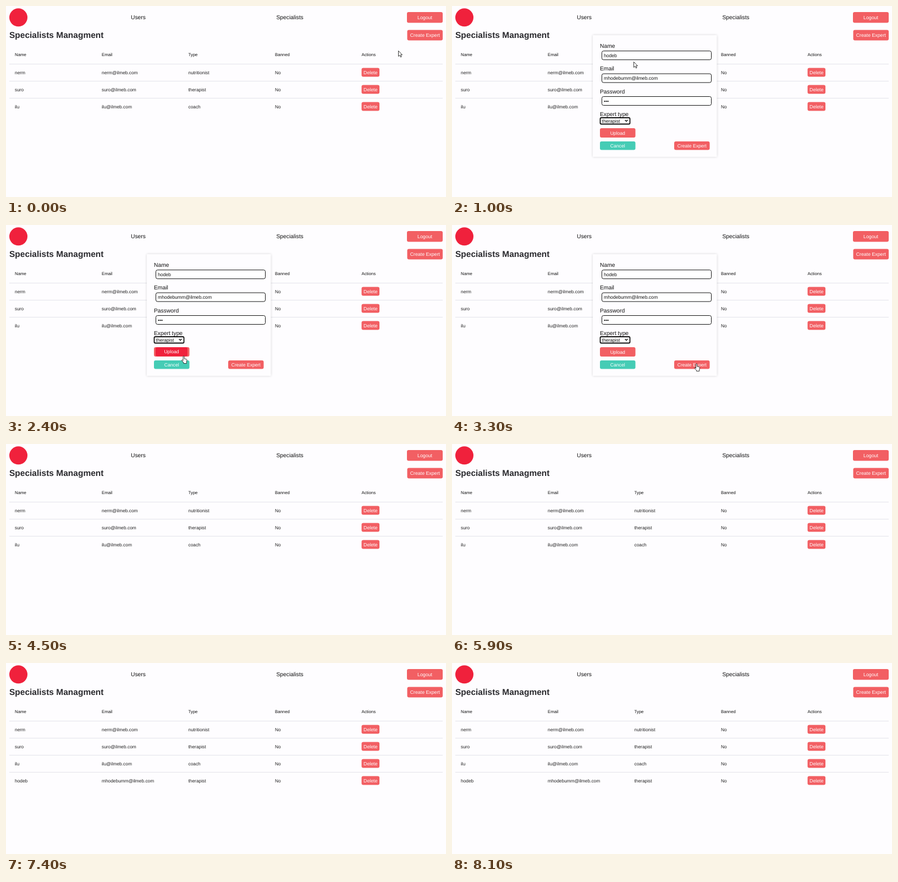
An HTML page that plays this animation: 800x347 px, repeating every 8200 ms.

```html
<!DOCTYPE html>
<html lang="en">
<head>
<meta charset="utf-8">
<title>Specialists</title>
<style>
html, body { margin: 0; width: 100%; height: 100%; overflow: hidden; background: #fefdff; }
svg { display: block; width: 800px; height: 347px; font: 8.6px "Liberation Sans", Arial, sans-serif; text-rendering: geometricPrecision; }
.panel { fill: #fefdff; filter: drop-shadow(0 0 2px rgba(0, 0, 0, .16)); }
.field { fill: #fff; stroke: #111; }
.pointer { fill: #fff; stroke: #222; stroke-width: .9; stroke-linejoin: round; }
</style>
</head>
<body>
<svg id="stage" viewBox="0 0 800 347"></svg>
<script>
const LOOP = 8200, STEP = 100;
const OPEN = 400, CLOSE = 4200, ADDED = 6500;
const CORAL = '#f25f63', TEAL = '#45ccb5', RED = '#f0213c';
const columns = [16, 174, 331.5, 489];
const people = [
  ['nerm', 'nerm@ilmeb.com', 'nutritionist', 'No'],
  ['suro', 'suro@ilmeb.com', 'therapist', 'No'],
  ['ilu', 'ilu@ilmeb.com', 'coach', 'No'],
  ['hodeb', 'mhodebumm@ilmeb.com', 'therapist', 'No']
];

const text = (s, x, y, size = 8.6, color = '#111', more = '') =>
  `<text x="${x}" y="${y}" font-size="${size}" fill="${color}" ${more}>${s}</text>`;

const rect = (x, y, w, h, rx, more) =>
  `<rect x="${x}" y="${y}" width="${w}" height="${h}" rx="${rx}" ${more}/>`;

const button = (label, x, y, w, h, color = CORAL, size = 8.6) =>
  rect(x, y, w, h, 3, `fill="${color}"`) +
  text(label, x + w / 2, y + h / 2 + 3.1, size, '#fff', 'text-anchor="middle"');

const line = y => `<path d="M6 ${y}H794" stroke="#e3e3e9"/>`;

function row(person, i) {
  const y = 120.5 + 31 * i;
  return line(y - 15) +
    person.map((s, c) => text(s, columns[c], y + 3, 8.36, '#222')).join('') +
    button('Delete', 646.5, y - 8, 32.5, 16, CORAL, 8.75);
}

function page(rows) {
  return `<circle cx="22.5" cy="20.8" r="16.5" fill="${RED}"/>` +
    text('Users', 227, 24.3, 10.3) + text('Specialists', 491.5, 24.3, 10.3) +
    text('Specialists Managment', 6, 57.6, 15.5, '#2a2a2e', 'font-weight="700"') +
    button('Logout', 729, 11, 65, 19.5, CORAL, 8.8) +
    button('Create Expert', 729.5, 43.5, 64.5, 19, CORAL, 8.75) +
    ['Name', 'Email', 'Type', 'Banned'].map((s, c) => text(s, columns[c], 91, 7.8)).join('') +
    text('Actions', 646.5, 91, 7.8) +
    people.slice(0, rows).map(row).join('');
}

// part of a string typed between two times
const typed = (s, t, from, to) =>
  s.slice(0, Math.max(0, Math.round(s.length * Math.min(1, (t - from) / (to - from)))));

function dialog(t, hover) {
  const [name, email, type] = people[3];
  const values = [typed(name, t, 500, 600), typed(email, t, 600, 800), typed('•••', t, 700, 800)];
  const chosen = t >= 900;
  return rect(256, 53, 225.5, 221, 1, 'class="panel"') +
    ['Name', 'Email', 'Password'].map((label, i) => {
      const y = 75.7 + 41.4 * i;
      return text(label, 269, y, 10.3) +
        rect(272.5, y + 6, 199, 16, 3, 'class="field"') +
        text(values[i], 276, y + 17.2);
    }).join('') +
    text('Expert type', 269, 199.5, 10.3) +
    rect(269.5, 203, 54, 11.5, 2, `class="field" stroke-width="${chosen ? 1.8 : 1}"`) +
    text(chosen ? type : people[0][2], 272.5, 211.7) +
    '<path d="M314.5 207l2.5 2.5 2.5-2.5" fill="none" stroke="#111" stroke-width="1.4"/>' +
    button('Upload', 269, 222, 64.5, 17) +
    (hover ? button('Upload', 272, 222, 58, 16.5, RED) : '') +
    button('Cancel', 269, 246, 64.5, 15.5, TEAL) +
    button('Create Expert', 404, 246, 64.5, 15.5);
}

// pointer stops: time, x, y
const stops = [
  [0, 713.5, 81.5], [300, 762, 55], [400, 762, 55], [600, 330.5, 99], [900, 330.5, 101.5],
  [1500, 330.5, 101.5], [2300, 323, 237], [2400, 323, 238], [2700, 323, 238],
  [3000, 405, 258], [3300, 444.5, 252], [CLOSE, 444.5, 252]
];

function pointerAt(t) {
  const i = Math.max(1, stops.findIndex(s => s[0] >= t));
  const [t0, x0, y0] = stops[i - 1], [t1, x1, y1] = stops[i];
  const k = (t - t0) / (t1 - t0), e = k * k * (3 - 2 * k);
  return [x0 + (x1 - x0) * e, y0 + (y1 - y0) * e];
}

const inside = ([x, y], l, t, r, b) => x >= l && x <= r && y >= t && y <= b;

function pointer([x, y], hand) {
  const d = hand
    ? 'M-1 7V1.1a1.1 1.1 0 0 1 2.2 0V5L5 5.8Q6 6 6 7.3L5.2 11V13.5H0V12L-3.3 8.6Q-4 7-2.6 7L-1 8.4Z'
    : 'M0 0V10L2.4 7.9 4 11.4 5.6 10.7 4.1 7.2H7Z';
  return `<path class="pointer" transform="translate(${x} ${y})" d="${d}"/>`;
}

function scene(t) {
  const open = t >= OPEN && t < CLOSE;
  let out = page(t >= ADDED ? 4 : 3);
  if (t < CLOSE) {
    const p = pointerAt(t);
    const upload = open && inside(p, 269, 222, 333.5, 239);
    const hand = upload || inside(p, 729.5, 43.5, 794, 62.5) ||
      open && (inside(p, 404, 246, 468.5, 261.5) || inside(p, 269, 246, 333.5, 261.5));
    if (open) out += dialog(t, upload);
    out += pointer(p, hand);
  }
  return out;
}

const stage = document.getElementById('stage');
const start = performance.now();
let shown = -1;

function draw() {
  const t = Math.floor((performance.now() - start) % LOOP / STEP) * STEP;
  if (t !== shown) stage.innerHTML = scene(shown = t);
  requestAnimationFrame(draw);
}
draw();
</script>
</body>
</html>
```
